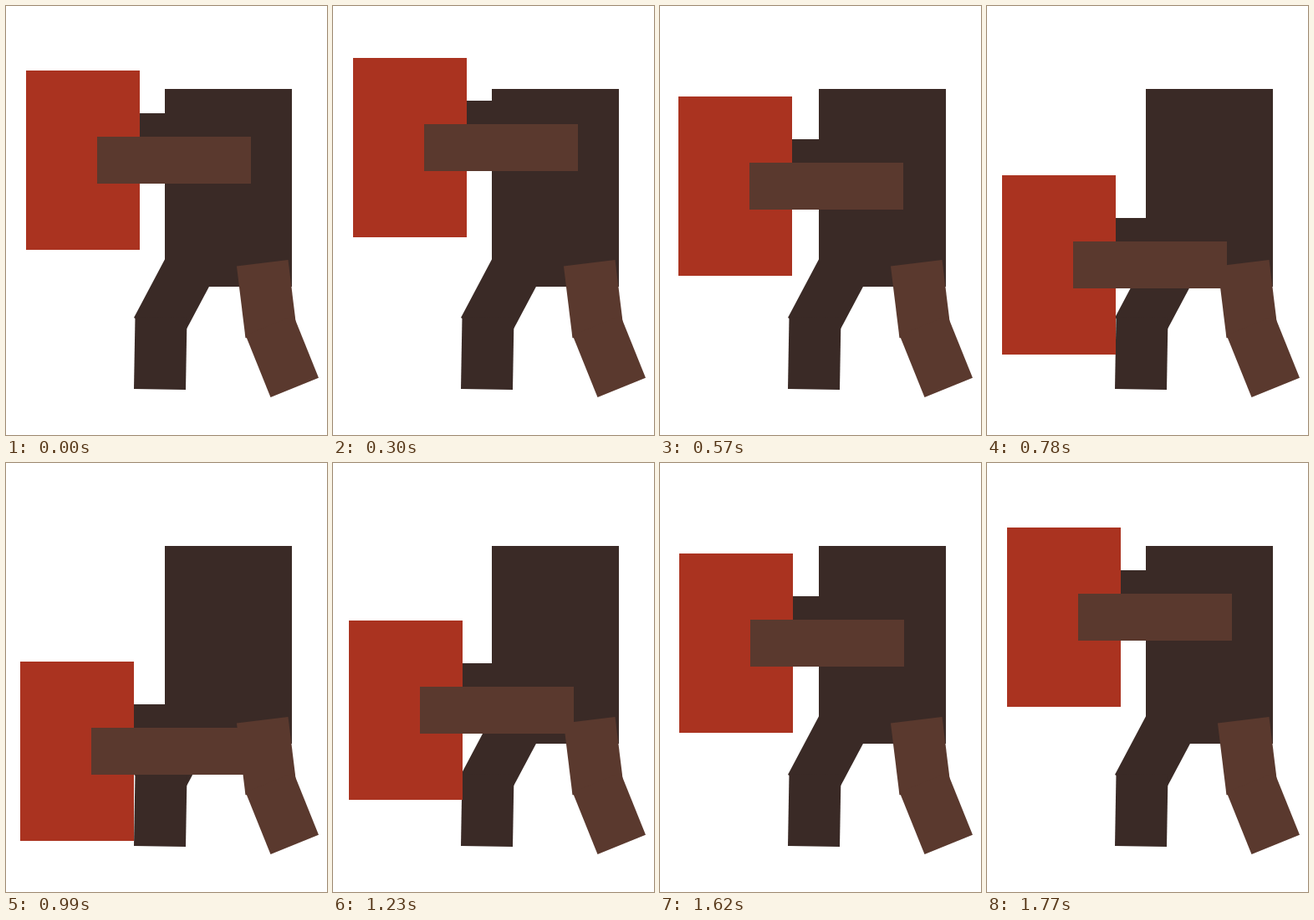
An HTML page with a canvas that plays this animation: 384 by 512 pixels, repeating every 1800 ms.

```html
<!DOCTYPE html>
<html lang="en">
<head>
<meta charset="utf-8">
<title>Carrying a box</title>
<style>
  html, body { margin: 0; width: 100%; height: 100%; overflow: hidden; background: #fff; }
  canvas { display: block; }
</style>
</head>
<body>
<canvas id="stage" width="384" height="512"></canvas>
<script>
const ctx = document.getElementById('stage').getContext('2d');
const DARK = '#3a2a26', BROWN = '#5a392e', RED = '#aa3320';
const LOOP = 1800, STEP = 30, LEG = 62;

// 0 before a, 1 after b, linear between
const ramp = (t, a, b) => Math.min(1, Math.max(0, (t - a) / (b - a)));

// The box lifts a little, drops fast, then rises slowly
function boxAt(t) {
  const lift = ramp(t, 0, 450), drop = ramp(t, 450, 900), rise = ramp(t, 900, 1770);
  return {
    x: Math.round(24 - 8 * drop + 8 * rise),
    y: Math.round(77 - 23 * lift + 202 * drop - 179 * rise)
  };
}

function rect(color, x, y, w, h) {
  ctx.fillStyle = color;
  ctx.fillRect(x, y, w, h);
}

// Leg segment turned around its lower left corner
function limb(color, x, y, deg, length) {
  ctx.save();
  ctx.translate(x, y);
  ctx.rotate(deg * Math.PI / 180);
  rect(color, 0, -length, LEG, length);
  ctx.restore();
}

function arm(color, x, y) {
  rect(color, x, y, 184, 56);
}

function draw(t) {
  const { x, y } = boxAt(t);
  rect('#fff', 0, 0, 384, 512);

  limb(DARK, 153, 372, 28, 86);
  limb(DARK, 153, 457, 1, 86);
  arm(DARK, x + 85, y + 51);
  rect(DARK, 190, 99, 152, 236);

  rect(RED, x, y, 136, 214);

  limb(BROWN, 286.5, 396.3, -7, 86.5);
  limb(BROWN, 316.5, 467, -22, 80);
  arm(BROWN, x + 85, y + 79);
}

const start = performance.now();

function tick() {
  const t = (performance.now() - start) % LOOP;
  draw(Math.floor(t / STEP) * STEP);
  requestAnimationFrame(tick);
}
tick();
</script>
</body>
</html>
```
